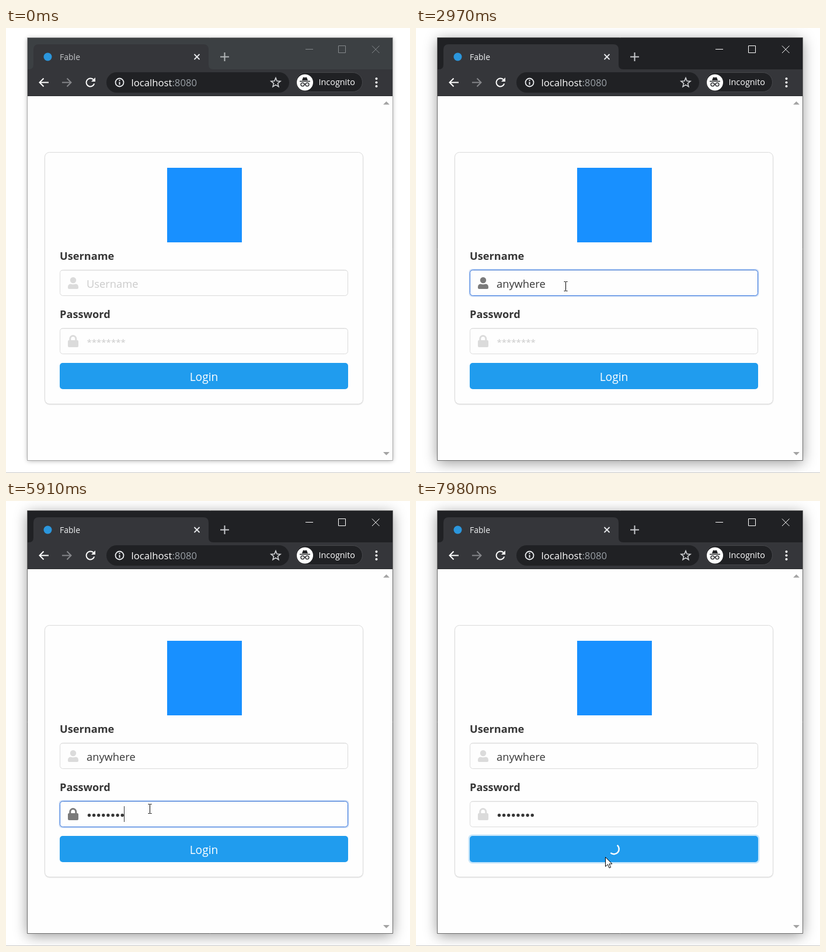
Animation, 692 px wide and 764 px high, one loop 8000 ms. Source, as an HTML page with a canvas:

```html
<!DOCTYPE html>
<html lang="en">
<head>
<meta charset="utf-8">
<title>Login</title>
<style>
html, body { margin: 0; width: 100%; height: 100%; overflow: hidden; background: #fff; }
canvas { display: block; width: 692px; height: 764px; }
</style>
</head>
<body>
<canvas id="stage" width="692" height="764"></canvas>
<script>
const ctx = document.getElementById('stage').getContext('2d');
const LOOP = 8000;
const SANS = '"Open Sans", "Noto Sans", sans-serif';
const USER = 'anywhere';

const FOCUS_USER = 810, FOCUS_PASS = 3500, FOCUS_BUTTON = 6540, LOADING = 6612;
const USER_KEYS = [1360, 1510, 1560, 1820, 2030, 2180, 2250, 2450];
const PASS_KEYS = [3990, 4170, 4240, 4680, 5040, 5200, 5270, 5420];
const CLICKS = [[770, 825], [3470, 3590], [6450, LOADING]];

// start, end, from x/y, control x/y, to x/y
const TRIPS = [
  [90, 730, 530, 743, 300, 580, 256, 443],
  [3220, 3450, 256, 443, 262, 490, 246, 528],
  [5920, 6140, 246, 528, 265, 585, 321, 625],
  [6350, 6440, 321, 625, 322, 617, 322, 609],
  [6900, 7150, 322, 609, 323, 609, 324, 609],
  [7560, 7600, 324, 609, 324, 610, 324, 611]
];

const ARROW = new Path2D('M0 0V16L4 12.5L6.5 18.5L9 17.5L6.5 11.5H11.5Z');
const HAND = new Path2D('M-2 1Q0-1.5 2 1V8Q4 6.5 6 8.5Q8.5 7.5 9.5 9.5Q12 9 12 12V17Q12 20 10 24H-1Q-2 21-4 19L-7 15Q-7.5 12-4.5 13L-2 15Z');
const KNUCKLES = new Path2D('M2 8V13M6 9V13M9.5 10V13');
const BEAM = new Path2D('M-3-8H-1Q0-8 0-7Q0-8 1-8H3M0-7V7M-3 8H-1Q0 8 0 7Q0 8 1 8H3');
const PERSON = new Path2D('M106 445Q106 439.5 111 439.5Q115 441 119 439.5Q124 439.5 124 445V446Q124 448 122 448H108Q106 448 106 446Z');
const SHACKLE = new Path2D('M109.8 537V533.5A5 5 0 0 1 119.8 533.5V537');
const TAB = new Path2D('M39 71Q47 71 47 63V37Q47 28 56 28H338Q347 28 347 37V63Q347 71 355 71Z');
const HAT = new Path2D('M507 90L508.7 85.2Q509.2 84 510.5 84.6L512 85.2L513.5 84.6Q514.8 84 515.3 85.2L517 90Z');

const over = (p, x, y, w, h) => p.x >= x && p.x <= x + w && p.y >= y && p.y <= y + h;
const typed = (keys, t) => keys.filter(k => k <= t).length;

function box(x, y, w, h, r, fill, stroke, width = 1) {
  ctx.beginPath();
  ctx.roundRect(x, y, w, h, r);
  if (fill) { ctx.fillStyle = fill; ctx.fill(); }
  if (stroke) { ctx.strokeStyle = stroke; ctx.lineWidth = width; ctx.stroke(); }
}

function disc(x, y, r, fill) {
  ctx.beginPath();
  ctx.arc(x, y, r, 0, 2 * Math.PI);
  ctx.fillStyle = fill;
  ctx.fill();
}

function ring(x, y, r, color, width, a = 0, b = 2 * Math.PI) {
  ctx.beginPath();
  ctx.arc(x, y, r, a, b);
  ctx.strokeStyle = color;
  ctx.lineWidth = width;
  ctx.stroke();
}

function line(path, color, width) {
  ctx.strokeStyle = color;
  ctx.lineWidth = width;
  ctx.stroke(typeof path === 'string' ? new Path2D(path) : path);
}

function fill(path, color) {
  ctx.fillStyle = color;
  ctx.fill(typeof path === 'string' ? new Path2D(path) : path);
}

function text(str, x, y, size, color, weight = 400, align = 'left') {
  ctx.font = `${weight} ${size}px ${SANS}`;
  ctx.textAlign = align;
  ctx.fillStyle = color;
  ctx.fillText(str, x, y);
}

function pointer(t) {
  if (t < TRIPS[0][0]) return null;
  const trip = TRIPS.filter(s => s[0] <= t).pop();
  const [t0, t1, ax, ay, cx, cy, bx, by] = trip;
  const k = Math.min(1, (t - t0) / (t1 - t0));
  const s = trip === TRIPS[0] ? 1 - (1 - k) ** 1.6 : k * k * (3 - 2 * k);
  const mix = (a, c, b) => (1 - s) ** 2 * a + 2 * s * (1 - s) * c + s * s * b;
  return { x: Math.round(mix(ax, cx, bx)), y: Math.round(mix(ay, cy, by)) };
}

function drawFrame(active) {
  ctx.save();
  ctx.shadowColor = active ? 'rgba(0,0,0,.42)' : 'rgba(0,0,0,.32)';
  ctx.shadowBlur = active ? 22 : 8;
  ctx.shadowOffsetY = active ? 4 : 1;
  box(37, 17, 625, 725, 0, '#fefefe');
  ctx.restore();
  box(36.5, 16.5, 626, 726, 0, null, active ? '#6a6a6a' : '#a8a8a8');

  ctx.fillStyle = active ? '#202124' : '#3c4043';
  ctx.fillRect(37, 17, 625, 54);
  fill(TAB, '#35363a');
  ctx.fillRect(37, 116, 625, 1);
  ctx.fillStyle = '#35363a';
  ctx.fillRect(37, 71, 625, 45);
  ctx.fillStyle = '#28292c';
  ctx.fillRect(37, 116, 625, 1);

  disc(71.5, 49.5, 7, '#2b96dc');
  text('Fable', 92, 55, 14, active ? '#f1f3f4' : '#c4c6c9');
  line('M322.5 45L331.5 54M331.5 45L322.5 54', '#e8eaed', 1.8);
  line('M374.5 42V57M367 49.5H382', active ? '#c8cacd' : '#b4b7ba', 2);
  const control = active ? '#fff' : '#85898c';
  line('M513 36.5H526M569.5 30.5H581.5V42.5H569.5ZM627 30.5L639.5 43M639.5 30.5L627 43', control, 1);
}

function drawToolbar() {
  line('M73 93.5H58M64.5 86.5L57.5 93.5L64.5 100.5', '#fff', 2);
  line('M96 93.5H111M104.5 86.5L111.5 93.5L104.5 100.5', '#85868a', 2);
  ring(144.5, 93.5, 7, '#fff', 2, 0.3, 5.5);
  fill('M153 85V92H146Z', '#fff');

  box(172, 76, 313, 35, 17.5, '#202124');
  ring(194.5, 93.5, 7, '#e8eaed', 1.8);
  ctx.fillStyle = '#e8eaed';
  ctx.fillRect(193.5, 92.5, 2, 5);
  ctx.fillRect(193.5, 89, 2, 2);
  text('localhost', 214.5, 99.5, 16.7, '#fff');
  text(':8080', 214.5 + ctx.measureText('localhost').width, 99.5, 16.7, '#9aa0a6');

  ctx.beginPath();
  for (let i = 0; i < 10; i++) {
    const a = -Math.PI / 2 + i * Math.PI / 5, r = i % 2 ? 3.6 : 8.4;
    ctx.lineTo(462 + r * Math.cos(a), 94 + r * Math.sin(a));
  }
  ctx.closePath();
  ctx.strokeStyle = '#d2d4d7';
  ctx.lineWidth = 1.6;
  ctx.stroke();

  box(496.5, 76.5, 114, 33, 16.5, '#202124', '#46474b');
  disc(512, 93.5, 14, '#fff');
  fill(HAT, '#202124');
  line('M503 91.5H521', '#202124', 1.5);
  ring(508, 97, 2.9, '#202124', 1.4);
  ring(516, 97, 2.9, '#202124', 1.4);
  line('M511 96.5Q512 95.8 513 96.5', '#202124', 1.3);
  text('Incognito', 535.5, 98, 14.4, '#fff');
  for (const y of [87, 93.5, 100]) disc(634.5, y, 2, '#fff');
}

function drawField(y, focused, hovered) {
  if (focused) box(90.5, y - 1.5, 497, 48, 6, 'rgba(50,115,220,.25)');
  box(92.5, y + .5, 493, 44, 5, '#fefefe', focused ? '#3273dc' : hovered ? '#b5b5b5' : '#dbdbdb');
  ctx.fillStyle = 'rgba(10,10,10,.06)';
  ctx.fillRect(95, y + 1, 488, 1);
}

function drawCaret(x, y, last, t) {
  if (Math.floor((t - last) / 500) % 2) return;
  ctx.fillStyle = '#363636';
  ctx.fillRect(Math.floor(x), y, 1, 27);
}

function drawForm(t, p) {
  const userOn = t >= FOCUS_USER && t < FOCUS_PASS;
  const passOn = t >= FOCUS_PASS && t < FOCUS_BUTTON;
  const loading = t >= LOADING;
  const hover = p && (t < 5900 || t > 6350) && !loading && over(p, 92, 575, 494, 45);
  const tint = on => on ? '#7a7a7a' : '#dbdbdb';

  ctx.save();
  ctx.shadowColor = 'rgba(10,10,10,.16)';
  ctx.shadowBlur = 2;
  ctx.shadowOffsetY = 1;
  box(66.5, 213.5, 545, 432, 8, '#fefefe');
  ctx.restore();
  box(66.5, 213.5, 545, 432, 8, null, '#dbdbdb');

  box(276, 240, 128, 128, 0, '#1890ff');

  text('Username', 92, 398, 18.2, '#363636', 700);
  drawField(415, userOn, p && over(p, 92, 415, 494, 45));
  disc(115, 433, 5.2, tint(userOn));
  fill(PERSON, tint(userOn));
  const n = typed(USER_KEYS, t);
  text(n ? USER.slice(0, n) : 'Username', 138, 446, 18.3, n ? '#363636' : '#cbcbcb');
  if (userOn) {
    const x = 138 + (n ? ctx.measureText(USER.slice(0, n)).width : 0);
    drawCaret(x, 424, n ? USER_KEYS[n - 1] : FOCUS_USER, t);
  }

  text('Password', 92, 498, 18.2, '#363636', 700);
  drawField(515, passOn, p && over(p, 92, 515, 494, 45));
  line(SHACKLE, tint(passOn), 3);
  box(106, 536, 18, 12, 2, tint(passOn));
  const m = typed(PASS_KEYS, t);
  if (!m) text('********', 138.5, 545, 15, '#cbcbcb');
  for (let i = 0; i < m; i++) disc(142.5 + 8.1 * i, 539.5, 2.7, '#363636');
  if (passOn) drawCaret(137.6 + 8.1 * m, 524, m ? PASS_KEYS[m - 1] : FOCUS_PASS, t);

  if (t >= FOCUS_BUTTON) box(89.5, 572.5, 499, 50, 7, 'rgba(32,156,238,.25)');
  box(92, 575, 494, 45, 5, hover ? '#1496ed' : '#209cee');
  if (loading) {
    const a = Math.PI / 4 + (t - LOADING) / 500 * 2 * Math.PI;
    ring(339, 597.5, 8.75, '#fff', 2.5, a, a + Math.PI);
  } else {
    text('Login', 339, 606, 19.2, '#fff', 400, 'center');
  }
  return hover;
}

function drawPointer(p, t, hover) {
  const inField = over(p, 92, 415, 494, 45) || over(p, 92, 515, 494, 45);
  ctx.save();
  ctx.translate(p.x + .5, p.y + .5);
  if (inField) {
    line(BEAM, '#fff', 3);
    line(BEAM, '#000', 1);
  } else {
    const shape = hover ? HAND : ARROW;
    fill(shape, '#fff');
    line(shape, '#000', 1);
    if (hover) line(KNUCKLES, '#000', 1);
  }
  ctx.restore();
  if (CLICKS.some(([a, b]) => t >= a && t < b)) disc(p.x, p.y, 15, 'rgba(255,245,0,.48)');
}

function draw(t) {
  const p = pointer(t);
  ctx.fillStyle = '#fff';
  ctx.fillRect(0, 0, 692, 764);
  drawFrame(t >= FOCUS_USER);
  drawToolbar();
  fill('M646 131.5L651.5 126L657 131.5ZM646 728L651.5 733.5L657 728Z', '#a3a3a3');
  const hover = drawForm(t, p);
  ctx.fillStyle = '#c8c8c8';
  ctx.fillRect(0, 763, 692, 1);
  if (p) drawPointer(p, t, hover);
}

const start = performance.now();
function tick() {
  draw((performance.now() - start) % LOOP);
  requestAnimationFrame(tick);
}
draw(0);
requestAnimationFrame(tick);
</script>
</body>
</html>
```
